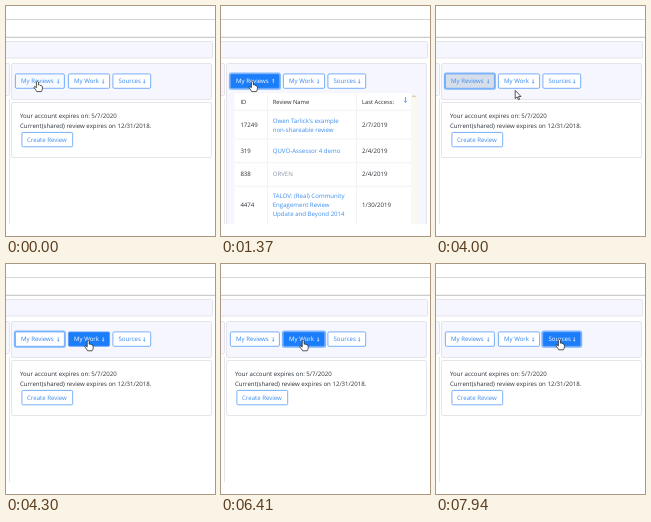
Recreate the animation shown at these times as an HTML page. Size 209 by 230 pixels, loop 8 s.

```html
<!DOCTYPE html>
<html lang="en">
<head>
<meta charset="utf-8">
<title>Review panel</title>
<style>
  html, body { margin: 0; width: 100%; height: 100%; overflow: hidden; background: #fff; }
  svg { display: block; width: 100vw; height: 100vh; }
  text { font: 6.1px "Open Sans", "Noto Sans", sans-serif; fill: #2b3036; text-rendering: geometricPrecision; white-space: pre; }
  .link { fill: #3d8df0; }
  .muted { fill: #8c95a6; }
  .head { font-size: 5.8px; }
  .bold { font-size: 5px; font-weight: 700; }
  .box { fill: #fff; stroke: #dfdfe5; stroke-width: .8; }
  .tint { fill: #f6f6fe; }
  .rule { fill: none; stroke: #e6e7ed; stroke-width: .7; }
  .outline { fill: #fff; stroke: #5a9cf6; stroke-width: .8; }
  .ring { fill: none; stroke: #007bff; stroke-opacity: .5; stroke-width: 1.4; }
  .arrow { fill: none; stroke-width: .65; }
  .cursor { fill: #fff; stroke: #222; stroke-width: .75; stroke-linejoin: round; }
</style>
</head>
<body>
<svg id="stage" viewBox="0 0 209 230" preserveAspectRatio="none"></svg>
<script>
const LOOP = 8000, STEP = 60;
const BLUE = [28, 125, 250], INK = [50, 132, 245], WHITE = [255, 255, 255], GREY = [222, 226, 232];
const stage = document.getElementById('stage');

function add(parent, tag, attrs, content) {
  const el = document.createElementNS('http://www.w3.org/2000/svg', tag);
  for (const k in attrs) el.setAttribute(k, attrs[k]);
  if (content !== undefined) el.textContent = content;
  parent.appendChild(el);
  return el;
}
const set = (el, attrs) => { for (const k in attrs) el.setAttribute(k, attrs[k]); };
const group = () => add(stage, 'g', {});
const rect = (p, x, y, width, height, cls, rx = 0) =>
  add(p, 'rect', { x, y, width, height, rx, class: cls });
const path = (p, d, cls) => add(p, 'path', { d, class: cls });
const label = (p, x, y, s, cls = '') => add(p, 'text', { x, y, class: cls }, s);
const lines = (p, x, y, gap, list, cls) => list.forEach((s, i) => label(p, x, y + i * gap, s, cls));
const show = (el, on) => el.style.display = on ? '' : 'none';

// Window frame
const frame = group();
path(frame, 'M0 13.5H209', 'rule').style.stroke = '#c4c4c6';
path(frame, 'M0 31.3H209', 'rule').style.stroke = '#a4a4a6';
rect(frame, -4, 35.5, 210.5, 16.5, 'box tint', 1);
rect(frame, -4, 57.5, 7.5, 32, 'box tint', 1);
path(frame, 'M3.5 93V218', 'rule').style.stroke = '#dcdce2';

const panel = rect(group(), 5.5, 57.5, 200, 36, 'box tint', 1.5);

// Account card
const card = group();
rect(card, 5.5, 96.5, 200, 55, 'box', 1.5);
label(card, 14, 112.2, 'Your account expires on: 5/7/2020');
label(card, 14, 121.6, 'Current(shared) review expires on 12/31/2018.');
rect(card, 15.9, 126.4, 50.8, 14.4, 'outline', 1.2);
label(card, 21, 135.8, 'Create Review', 'link');

// Reviews list
const reviews = group();
rect(reviews, 13.5, 87, 176.5, 143, '').style.fill = '#fff';
rect(reviews, 190, 87, 6, 143, '').style.fill = '#f9f9f2';
path(reviews, 'M13.5 104.3H190M13.5 133H190M13.5 156.7H190M13.5 180.3H190M46.5 87V230M135.5 87V230', 'rule')
  .style.stroke = '#eeeef2';
label(reviews, 19.4, 98, 'ID', 'head');
label(reviews, 51.7, 98, 'Review Name', 'head');
label(reviews, 141, 98, 'Last Access:', 'head');
path(reviews, 'M184.5 91V96.4M183 94.8L184.5 96.4 186 94.8', 'arrow').style.stroke = '#2a83f6';
path(reviews, 'M191.4 91.3L193 89.6 194.6 91.3', 'arrow').style.stroke = '#8a8a70';
[
  [121.2, '17249', '2/7/2019', ["Owen Tarlick's example", 'non-shareable review']],
  [147.2, '319', '2/4/2019', ['QUVO-Assessor 4 demo']],
  [170.2, '838', '2/4/2019', ['ORVEN'], 'muted'],
  [201.2, '4474', '1/30/2019', ['TALOV: (Real) Community', 'Engagement Review', 'Update and Beyond 2014']]
].forEach(([y, id, date, name, cls = 'link']) => {
  label(reviews, 19.4, y, id);
  lines(reviews, 51.7, y - (name.length - 1) * 4.4, 8.8, name, cls);
  label(reviews, 141, y, date);
});

// Work list
const work = group();
path(work, 'M14 88H197M14 106H197M14 144.5H197M14 183H197', 'rule');
[[19, 'Codes to apply'], [66, 'Group'], [103.7, 'Allocated'], [136.5, 'Started'], [164.5, 'Remaining']]
  .forEach(([x, s]) => label(work, x, 99, s, 'bold'));
[
  [117, '20', ['Screen on', 'title &', 'abstract'], ['Group 1', 'T&A']],
  [156.2, '8', ['Screen on', 'full report'], ['Group 1', 'full', 'report']]
].forEach(([y, count, code, team]) => {
  lines(work, 19, y, 8.9, code);
  lines(work, 66, y, 8.9, team);
  [[109, count], [142, count], [170, '0']].forEach(([x, s]) => label(work, x, y + 2.3, s, 'link'));
});

// Menu buttons
const menu = group();
const buttons = [
  [9.4, 49, 'My Reviews', 52.3],
  [62.4, 41.2, 'My Work', 97.2],
  [106.9, 37.8, 'Sources', 138.3]
].map(([x, w, name, ax]) => ({
  ax,
  ring: rect(menu, x - .8, 67.1, w + 1.6, 16, 'ring', 1.8),
  face: rect(menu, x, 67.9, w, 14.4, 'outline', 1.3),
  text: label(menu, x + 5.6, 77.4, name),
  arrow: path(menu, '', 'arrow')
}));

rect(group(), 0, 218, 209, 12, '').style.fill = '#fff';

const hand = path(group(), 'M-1 1Q0-.6 1 1V4Q2 3.2 2.6 4.4 3.6 3.8 4 5 5 4.8 5 6V7.6Q5 9 4 10.6H-.6Q-1.6 8.8-3.2 6.9-3.9 5.6-2.6 5.5L-1 6.7Z', 'cursor');
const pointer = path(group(), 'M0 0V8.2L1.9 6.5 3.2 9.4 4.4 8.9 3.2 6.1H5.8Z', 'cursor');

// Tracks: [time, value...]
const moves = [
  [3760, 31.4, 75], [3820, 38, 77], [3880, 53, 81], [3940, 69, 84], [4000, 79.2, 84.4],
  [4060, 82, 81.5], [4180, 82.6, 77.5], [4300, 82.2, 76.2],
  [6810, 82.2, 76.2], [6870, 94, 79.5], [6930, 109, 77], [6990, 121.4, 72.2], [7080, 123.6, 74], [7350, 123.4, 75.2]
];
const fills = [
  [[0, .04], [60, .45], [120, .85], [180, 1], [3820, 1], [3940, .5], [4000, .04], [4060, 0]],
  [[4000, 0], [4060, .2], [4120, .6], [4180, .9], [4240, 1], [6930, 1], [6990, .78], [7050, .4], [7110, .1], [7170, 0]],
  [[6930, 0], [6990, .2], [7050, .6], [7110, .9], [7170, 1]]
];

function sample(track, t) {
  const i = track.findIndex(k => k[0] > t);
  if (i === 0) return track[0].slice(1);
  if (i < 0) return track[track.length - 1].slice(1);
  const a = track[i - 1], b = track[i], p = (t - a[0]) / (b[0] - a[0]);
  return a.slice(1).map((v, n) => v + (b[n + 1] - v) * p);
}
const mix = (a, b, p) => `rgb(${a.map((v, i) => Math.round(v + (b[i] - v) * p))})`;
const within = (t, a, b) => t >= a && t < b;

function render(time) {
  // The screen updates in steps counted from the start of each move.
  const base = time >= 6810 ? 6810 : time >= 3760 ? 3760 : 0;
  const t = base + Math.floor((time - base) / STEP) * STEP;

  const open = within(time, 1240, 3100) ? 0 : within(time, 4820, 6410) ? 1 : -1;
  const focus = time < 1180 ? -1 : time < 4760 ? 0 : time < 7880 ? 1 : 2;

  show(reviews, open === 0);
  show(work, open === 1);
  show(card, open !== 0);
  set(card, { transform: `translate(0 ${open === 1 ? 108.5 : 0})` });
  set(panel, { height: [36, 180, 144.5][open + 1] });

  buttons.forEach((b, i) => {
    const fill = sample(fills[i], t)[0];
    const ink = mix(INK, WHITE, Math.min(1, fill * 1.3));
    const leaving = i === 0 && within(t, 3880, 4060);
    b.face.style.fill = mix(leaving ? GREY : WHITE, BLUE, fill);
    b.text.style.fill = b.arrow.style.stroke = ink;
    show(b.ring, i === focus);
    const tip = open === i ? 73.3 : 77.2, wing = open === i ? .9 : -.9;
    set(b.arrow, { d: `M${b.ax} 73.3V77.2M${b.ax - .8} ${tip + wing}L${b.ax} ${tip} ${b.ax + .8} ${tip + wing}` });
  });

  const [x, y] = sample(moves, t);
  const plain = within(t, 3940, 4060) || within(t, 6930, 6990);
  show(hand, !plain);
  show(pointer, plain);
  set(plain ? pointer : hand, { transform: `translate(${x} ${y})` });
}

const start = performance.now();
function tick(now) {
  render(Math.max(0, now - start) % LOOP);
  requestAnimationFrame(tick);
}
render(0);
requestAnimationFrame(tick);
</script>
</body>
</html>
```
